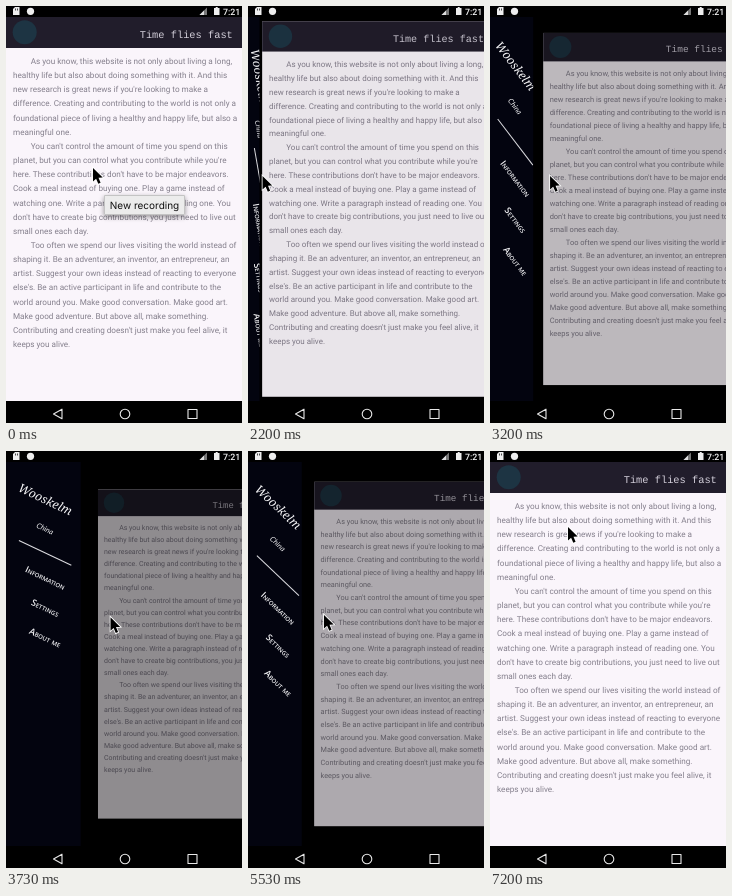
Recreate the animation shown at these times as an HTML page with a canvas. Size 236 px wide and 417 px high, loop 8 s.

```html
<!DOCTYPE html>
<html lang="en">
<head>
<meta charset="utf-8">
<title>Rotating drawer</title>
<style>
html, body { margin: 0; width: 100%; height: 100%; overflow: hidden; background: #000; }
canvas { display: block; width: 236px; height: 417px; }
</style>
</head>
<body>
<canvas id="stage"></canvas>
<script>
const W = 236, H = 417, LOOP = 8000;
const TOP = 11, BOTTOM = 395, BAR = 31, DRAWER = 104;
const MID = (TOP + BOTTOM) / 2;

const canvas = document.getElementById('stage');
const ctx = canvas.getContext('2d');
const dpr = window.devicePixelRatio || 1;
canvas.width = Math.round(W * dpr);
canvas.height = Math.round(H * dpr);

const ARTICLE = [
  '>As you know, this website is not only about living a long,',
  'healthy life but also about doing something with it. And this',
  "new research is great news if you're looking to make a",
  'difference. Creating and contributing to the world is not only a',
  'foundational piece of living a healthy and happy life, but also a',
  'meaningful one.',
  ">You can't control the amount of time you spend on this",
  "planet, but you can control what you contribute while you're",
  "here. These contributions don't have to be major endeavors.",
  'Cook a meal instead of buying one. Play a game instead of',
  'watching one. Write a paragraph instead of reading one. You',
  "don't have to create big contributions, you just need to live out",
  'small ones each day.',
  '>Too often we spend our lives visiting the world instead of',
  'shaping it. Be an adventurer, an inventor, an entrepreneur, an',
  'artist. Suggest your own ideas instead of reacting to everyone',
  "else's. Be an active participant in life and contribute to the",
  'world around you. Make good conversation. Make good art.',
  'Make good adventure. But above all, make something.',
  "Contributing and creating doesn't just make you feel alive, it",
  'keeps you alive.'
];

const ITEM_FONT = 'small-caps 600 9px "Open Sans", sans-serif';
const MENU = [
  { text: 'Wooskelm', y: 38, font: 'italic 500 12px "Noto Serif", serif' },
  { text: 'China', y: 56, font: 'italic 7.4px Lato, sans-serif' },
  { rule: 58, y: 70 },
  { text: 'Information', y: 84.5, font: ITEM_FONT },
  { text: 'Settings', y: 104, font: ITEM_FONT },
  { text: 'About me', y: 123, font: ITEM_FONT }
];

// Keys are [time, value, easing of the segment that ends here].
const linear = u => u;
const smooth = u => u * u * (3 - 2 * u);
const easeOut = u => 1 - (1 - u) * (1 - u);

const OPEN = [
  [2000, 0], [2190, .11, easeOut], [2400, .12], [2800, .21], [3200, .415],
  [3670, .64], [4200, 1, easeOut], [4730, 1], [5530, .517, smooth],
  [5600, .517], [5870, .035, easeOut], [6000, 0, easeOut]
];
const CURSOR_X = [
  [1000, 87], [1270, 10, smooth], [1470, 10], [1530, 14.5], [2200, 14.5],
  [2800, 30], [3200, 60], [3670, 93], [4200, 146, easeOut], [4730, 146],
  [5530, 76, smooth], [5600, 76], [5840, 30, easeOut], [6530, 30], [7200, 78, smooth]
];
const CURSOR_Y = [
  [1000, 162], [1270, 167, smooth], [1470, 167], [1530, 170], [3200, 170],
  [4200, 163], [4730, 163], [5530, 164], [5870, 163], [6530, 163], [7200, 76, smooth]
];
const TIP = [[70, 1], [730, 0]];

function at(keys, t) {
  if (t <= keys[0][0]) return keys[0][1];
  for (let i = 1; i < keys.length; i++) {
    const [t1, v1, ease = linear] = keys[i];
    if (t <= t1) {
      const [t0, v0] = keys[i - 1];
      return v0 + (v1 - v0) * ease((t - t0) / (t1 - t0));
    }
  }
  return keys[keys.length - 1][1];
}

function rect(x, y, w, h, color) {
  ctx.fillStyle = color;
  ctx.fillRect(x, y, w, h);
}

function label(text, x, y, font, color, align = 'left') {
  ctx.font = font;
  ctx.fillStyle = color;
  ctx.textAlign = align;
  ctx.fillText(text, x, y);
}

function poly(points, color) {
  ctx.beginPath();
  points.forEach(([x, y]) => ctx.lineTo(x, y));
  ctx.closePath();
  if (color) {
    ctx.fillStyle = color;
    ctx.fill();
  }
}

function disc(x, y, r, color) {
  ctx.beginPath();
  ctx.arc(x, y, r, 0, Math.PI * 2);
  if (color) {
    ctx.fillStyle = color;
    ctx.fill();
  }
}

function drawPage(p) {
  const s = 1 - .2 * p;
  ctx.save();
  ctx.translate(W / 2 + (DRAWER + .5) * p, MID);
  ctx.scale(s, s);
  ctx.translate(-W / 2, -MID);
  rect(0, TOP, W, BOTTOM - TOP, '#faf5fb');
  rect(0, TOP, W, BAR, '#211d2b');
  disc(18.7, 26.3, 12, '#1d3443');
  label('Time flies fast', 133.7, 32.3, '10.35px "Liberation Mono", monospace', '#d3cfda');
  ARTICLE.forEach((line, i) => {
    const indent = line[0] === '>';
    label(indent ? line.slice(1) : line, indent ? 24.7 : 7, 58 + i * 14.15,
      '8.17px Roboto, sans-serif', '#847f8c');
  });
  if (p > 0) rect(0, TOP, W, BOTTOM - TOP, `rgba(0,0,0,${.6 * p})`);
  ctx.restore();
}

function drawDrawer(p) {
  if (p <= 0) return;
  const q = 1 - p;
  ctx.save();
  ctx.beginPath();
  ctx.rect(0, TOP, DRAWER * p, BOTTOM - TOP);
  ctx.clip();
  rect(0, TOP, DRAWER, BOTTOM - TOP, '#03040f');
  MENU.forEach((item, i) => {
    ctx.save();
    ctx.translate(52 * p + 6.3 * q, item.y + 37.7 * (i + 1) * q);
    ctx.rotate(q * Math.PI / 2);
    if (item.rule) rect(-item.rule / 2, -.5, item.rule, 1, '#dcdce0');
    else label(item.text, 0, i ? 3 : 4, item.font, '#f4f4f6', 'center');
    ctx.restore();
  });
  ctx.restore();
}

function drawSystemBars() {
  rect(0, 0, W, TOP, '#000');
  rect(0, BOTTOM, W, H - BOTTOM, '#000');

  poly([[9, 1], [13.5, 1], [13.5, 9], [7, 9], [7, 3]], '#eee');
  rect(9, 2.5, .8, 2, '#222');
  rect(11, 2.5, .8, 2, '#222');
  disc(24.5, 5.3, 3.6, '#eee');

  poly([[201, 1.5], [201, 9], [193.5, 9]], '#777');
  poly([[198, 4.5], [198, 9], [193.5, 9]], '#ddd');
  rect(208, 2, 5.5, 7, '#eee');
  rect(209.7, 1, 2, 1, '#eee');
  label('7:21', 217, 8.6, '500 8.8px Roboto, sans-serif', '#f5f5f5');

  ctx.strokeStyle = '#e8e8e8';
  ctx.lineWidth = 1.1;
  ctx.lineJoin = 'round';
  poly([[47.5, 408], [56, 403.2], [56, 412.8]]);
  ctx.stroke();
  disc(119, 408, 4.8);
  ctx.stroke();
  ctx.strokeRect(182, 403.5, 9, 9);
}

function drawTip(alpha) {
  if (alpha <= 0) return;
  ctx.save();
  ctx.globalAlpha = alpha;
  ctx.shadowColor = 'rgba(0,0,0,.4)';
  ctx.shadowBlur = 5 * dpr;
  ctx.shadowOffsetY = 2 * dpr;
  rect(98, 189, 81, 20, '#ececec');
  ctx.shadowColor = 'transparent';
  ctx.strokeStyle = '#c4c4c4';
  ctx.lineWidth = 1;
  ctx.strokeRect(98.5, 189.5, 80, 19);
  label('New recording', 138.5, 202.6, '10px Inter, sans-serif', '#111', 'center');
  ctx.restore();
}

function drawCursor(x, y) {
  ctx.save();
  ctx.translate(x, y);
  poly([[0, 0], [0, 13.5], [3.1, 10.7], [5.3, 15.8], [7.6, 14.8], [5.5, 9.8], [9.7, 9.6]]);
  ctx.lineJoin = 'miter';
  ctx.lineWidth = 1.6;
  ctx.strokeStyle = '#fff';
  ctx.stroke();
  ctx.fillStyle = '#000';
  ctx.fill();
  ctx.restore();
}

function draw(t) {
  const p = at(OPEN, t);
  ctx.setTransform(dpr, 0, 0, dpr, 0, 0);
  ctx.textRendering = 'geometricPrecision';
  rect(0, 0, W, H, '#000');
  drawPage(p);
  drawDrawer(p);
  drawSystemBars();
  drawTip(at(TIP, t));
  drawCursor(at(CURSOR_X, t), at(CURSOR_Y, t));
}

const start = performance.now();
function tick() {
  draw((performance.now() - start) % LOOP);
  requestAnimationFrame(tick);
}
tick();
</script>
</body>
</html>
```
